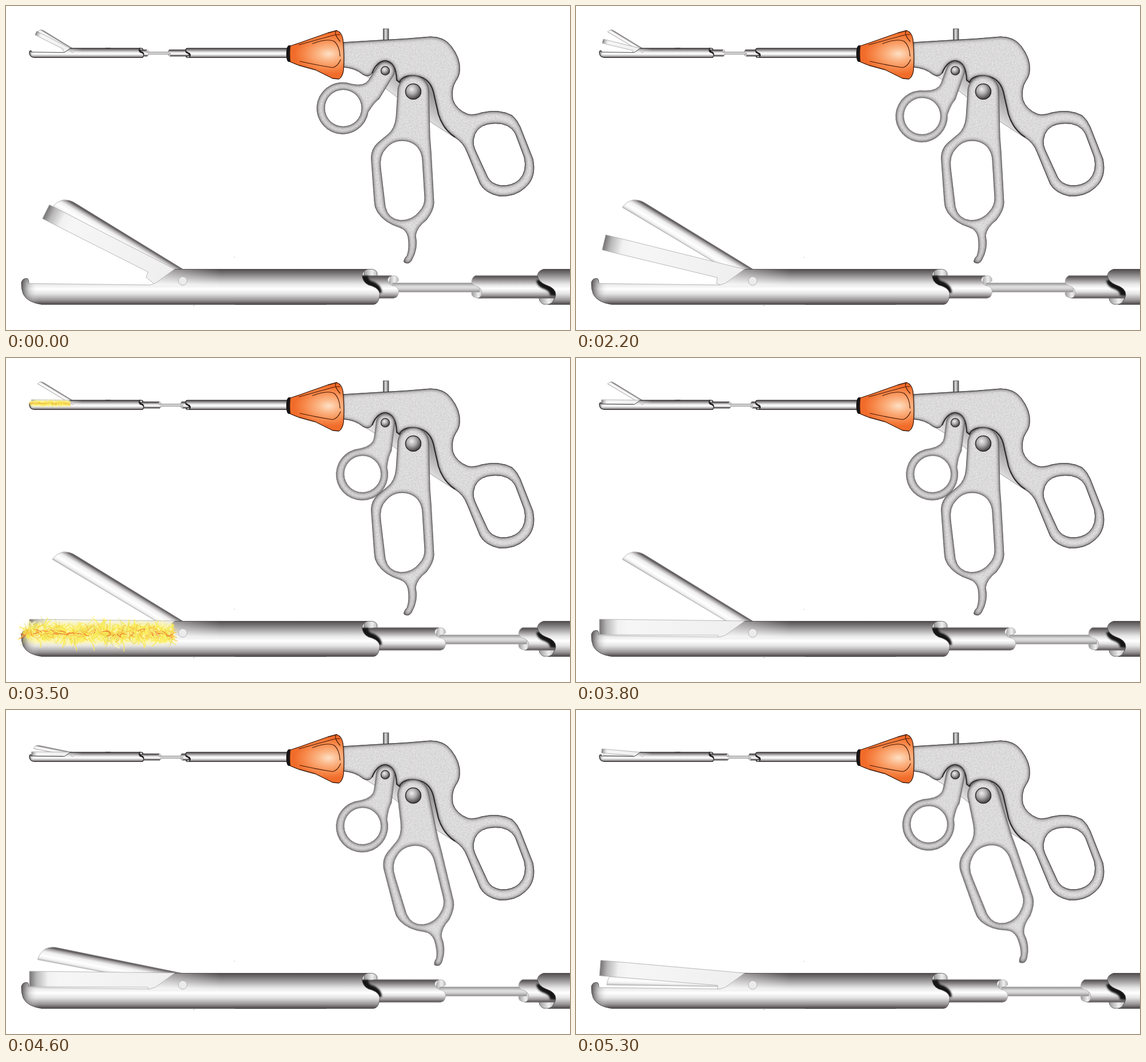
An HTML page for the animation above (7300 ms loop, 986 by 568 pixels).

```html
<!DOCTYPE html>
<html lang="en">
<head>
<meta charset="utf-8">
<title>Grasping forceps</title>
<style>
html, body { margin: 0; width: 100%; height: 100%; overflow: hidden; background: #fff; }
svg { display: block; width: 100%; height: 100%; }
.big { --edge: #4f4a4b; --w: .8px; --soft: #a9a7a7; --lip: #b5b3b3; }
.small { --edge: #2c2a2b; --w: 1.2px; --soft: #a2a0a0; --lip: #3a3839; }
.edge { stroke: var(--edge); stroke-width: var(--w); vector-effect: non-scaling-stroke; }
.soft { stroke: var(--soft); stroke-width: .8px; vector-effect: non-scaling-stroke; }
.lip { stroke: var(--lip); stroke-width: .9px; vector-effect: non-scaling-stroke; }
.line { fill: none; }
.metal { fill: #e6e5e5; stroke: #6d6a6b; stroke-width: .8px; fill-rule: evenodd; filter: url(#metal); }
#body { stroke: #2f2c2d; stroke-width: 1px; }
.groove { fill: none; stroke: #4a1c08; stroke-width: 1.2px; stroke-linecap: round; }
#fuzz path { fill: none; stroke-linecap: round; opacity: .8; }
</style>
</head>
<body>
<svg viewBox="0 0 986 568" preserveAspectRatio="none">
<defs>
  <linearGradient id="tube" gradientUnits="userSpaceOnUse" x1="0" y1="461" x2="0" y2="523.500">
    <stop offset="0" stop-color="#4d4849"/><stop offset=".2" stop-color="#969394"/>
    <stop offset=".42" stop-color="#e8e7e7"/><stop offset=".56" stop-color="#fff"/>
    <stop offset=".7" stop-color="#e4e3e3"/><stop offset=".88" stop-color="#979394"/>
    <stop offset="1" stop-color="#464142"/>
  </linearGradient>
  <linearGradient id="core" href="#tube" y1="473" y2="512.500"/>
  <linearGradient id="rod" gradientUnits="userSpaceOnUse" x1="0" y1="485" x2="0" y2="502">
    <stop offset="0" stop-color="#8d8b8b"/><stop offset=".4" stop-color="#e2e1e1"/>
    <stop offset=".65" stop-color="#d2d1d1"/><stop offset="1" stop-color="#878485"/>
  </linearGradient>
  <linearGradient id="far" x1="0" y1="0" x2="1" y2="0">
    <stop offset="0" stop-color="#999"/><stop offset=".6" stop-color="#f0f0f0"/><stop offset="1" stop-color="#bbb"/>
  </linearGradient>
  <linearGradient id="fade" gradientUnits="userSpaceOnUse" x1="275" y1="0" x2="375" y2="0">
    <stop offset="0" stop-color="#fff" stop-opacity=".5"/><stop offset="1" stop-color="#fff" stop-opacity="0"/>
  </linearGradient>
  <linearGradient id="nib" gradientUnits="userSpaceOnUse" x1="27" y1="0" x2="56" y2="0">
    <stop offset="0" stop-color="#3e393a" stop-opacity=".85"/><stop offset=".45" stop-color="#777" stop-opacity=".3"/>
    <stop offset="1" stop-color="#fff" stop-opacity="0"/>
  </linearGradient>
  <linearGradient id="cover" gradientUnits="userSpaceOnUse" x1="170" y1="407" x2="183" y2="385.6">
    <stop offset="0" stop-color="#bbb9b9"/><stop offset=".16" stop-color="#f1f1f1"/>
    <stop offset=".35" stop-color="#fff"/><stop offset=".65" stop-color="#f0efef"/>
    <stop offset=".85" stop-color="#aeabac"/><stop offset="1" stop-color="#5f5b5c"/>
  </linearGradient>
  <linearGradient id="blade" gradientUnits="userSpaceOnUse" x1="41" y1="0" x2="290" y2="0">
    <stop offset="0" stop-color="#757273"/><stop offset=".05" stop-color="#b9b8b8"/>
    <stop offset=".13" stop-color="#f1f1f1"/><stop offset=".2" stop-color="#f6f6f6"/><stop offset="1" stop-color="#efefef"/>
  </linearGradient>
  <linearGradient id="post"><stop offset="0" stop-color="#555"/><stop offset=".45" stop-color="#e5e5e5"/><stop offset="1" stop-color="#555"/></linearGradient>
  <linearGradient id="plate" gradientUnits="userSpaceOnUse" x1="705" y1="125" x2="678" y2="160">
    <stop offset="0" stop-color="#999797"/><stop offset="1" stop-color="#eae9e9"/>
  </linearGradient>
  <radialGradient id="ball" cx=".4" cy=".35" r=".65">
    <stop offset="0" stop-color="#eee"/><stop offset=".45" stop-color="#b2b0b0"/><stop offset="1" stop-color="#454142"/>
  </radialGradient>
  <radialGradient id="knob" gradientUnits="userSpaceOnUse" cx="0" cy="0" r="1" gradientTransform="translate(564 84) scale(60 36)">
    <stop offset="0" stop-color="#fee0c4"/><stop offset=".3" stop-color="#fcb788"/>
    <stop offset=".7" stop-color="#f78a4c"/><stop offset="1" stop-color="#f16c2a"/>
  </radialGradient>
  <filter id="blur" x="-30%" y="-30%" width="160%" height="160%"><feGaussianBlur stdDeviation="1.6"/></filter>
  <filter id="glow" x="-20%" y="-60%" width="140%" height="220%"><feGaussianBlur stdDeviation="5"/></filter>
  <!-- bevelled edge plus a fine satin grain -->
  <filter id="metal" color-interpolation-filters="sRGB">
    <feComponentTransfer in="SourceAlpha"><feFuncA type="table" tableValues="1 0"/></feComponentTransfer>
    <feGaussianBlur stdDeviation="3.8"/>
    <feComponentTransfer result="rim"><feFuncA type="linear" slope="1.4"/></feComponentTransfer>
    <feFlood flood-color="#474344"/>
    <feComposite in2="rim" operator="in"/>
    <feComposite in2="SourceAlpha" operator="in" result="bevel"/>
    <feTurbulence type="fractalNoise" baseFrequency=".4" numOctaves="2" seed="4"/>
    <feColorMatrix values="0 0 0 0 .5 0 0 0 0 .49 0 0 0 0 .49 .4 0 0 0 -.1"/>
    <feComposite in2="SourceAlpha" operator="in" result="grain"/>
    <feMerge><feMergeNode in="SourceGraphic"/><feMergeNode in="grain"/><feMergeNode in="bevel"/></feMerge>
  </filter>
</defs>
<rect width="986" height="568" fill="#fff"/>

<g class="big">
  <g id="joint">
    <path class="edge" fill="url(#far)" d="M626 461.500H640Q650 463 649 472Q646 476 638 476V490H626Z"/>
    <path class="edge" fill="url(#far)" d="M932 506Q930 519 940 523H950Q962 518 960 496H936Z"/>
    <g id="slide">
      <path class="soft" fill="url(#far)" d="M672 473H680Q687 475 686 482Q680 487 676 486V491H668Z"/>
      <path class="soft" fill="url(#far)" d="M818 496Q811 503 816 509Q820 512 826 512H834V494Z"/>
      <path class="soft" fill="url(#rod)" d="M676 485.500H828V501.500H676Z"/>
      <path class="soft" fill="url(#core)" d="M540 473H674Q666 476 668 483Q671 490 680 491Q688 495 686 504Q684 512 678 512H540Z"/>
      <path class="soft" fill="url(#core)" d="M1060 473H820Q814 476 814 484Q816 490 825 492Q834 497 831 506Q829 512 824 512H1060Z"/>
      <path class="edge line" d="M560 473H674M560 512H678M820 473H1040M826 512H1040"/>
    </g>
    <g class="line" stroke="#181516" stroke-width="12" filter="url(#blur)">
      <path d="M627 473Q627 486 641 489Q651 494 651 503"/>
      <path d="M933 480Q934 488 944 491Q958 497 957 508"/>
    </g>
    <path fill="url(#tube)" d="M400 461H632Q621 465 623 476Q626 488 640 491Q656 497 653 510Q650 523.500 642 523.500H400Z"/>
    <path fill="url(#tube)" d="M1606 461H940Q930 464 929 473Q931 484 944 489Q962 495 961 507Q958 522 948 523.500H1606Z"/>
    <path class="edge line" d="M400 461.500H632Q621 465 623 476Q626 488 640 491Q656 497 653 510Q650 523 642 523H400M1606 461.500H940Q930 464 929 473Q931 484 944 489Q962 495 961 507Q958 522 948 523H1606"/>
  </g>
  <g id="jaws">
    <path id="upper" class="soft" fill="url(#cover)" d="M81 353Q88 343 100 340Q112 339 122 346L309 461L300 476L262 461Z"/>
    <path id="middle" class="soft" fill="url(#blade)" d="M41 458L303 461L300 490L268 500L249 496L248 486L41 485Z"/>
    <path fill="url(#tube)" d="M295 461H560V523.500H62Q38 520 30 505Q26 495 27 484Q30 476 38 478Q40 480 40 486L252 489Q262 487 268 481Z"/>
    <path fill="url(#fade)" d="M295 461H390V490H252Q262 487 268 481Z"/>
    <path fill="url(#nib)" d="M60 523Q38 520 30 505Q26 495 27 484Q30 476 38 478Q40 480 40 486L60 486Z"/>
    <path class="edge line" d="M295 461.500H560M560 523H62Q38 520 30 505Q26 495 27 484Q30 476 38 478Q40 480 40 486"/>
    <path class="lip line" d="M40 486.500L252 489Q262 487 268 481L295 461"/>
    <circle class="soft" cx="309" cy="482" r="7.500" fill="#ebebeb"/>
    <g id="fuzz">
      <rect x="34" y="466" width="258" height="32" rx="14" fill="#fbf07a" filter="url(#glow)"/>
      <path stroke="#fdf8b8" stroke-width="2.600"/>
      <path stroke="#faec4e" stroke-width="1.800"/>
      <path stroke="#dccb4a" stroke-width=".7"/>
      <path stroke="#f8bb3c" stroke-width="1.200"/>
      <path stroke="#ee6a2c" stroke-width="1.300"/>
    </g>
  </g>
  <path class="soft line" d="M325 523L330 526M398.500 440.500H400"/>
</g>

<g class="small">
  <use href="#joint" transform="translate(66.800 -48.600) scale(.266)"/>
  <use href="#jaws" transform="translate(33.800 -48.600) scale(.266)"/>
</g>

<rect x="659.500" y="40" width="9.500" height="22" fill="url(#post)" stroke="#444" stroke-width=".8"/>
<path fill="url(#plate)" stroke="#8a8889" stroke-width=".8" d="M630 123Q660 140 690 165Q730 197 790 234L760 140L700 118L650 100Z"/>
<path id="body" class="metal" d="M588 64L655 60Q700 58 742 54Q766 54 778 70Q795 92 793 113Q793 122 786 132Q778 145 781 164Q787 182 808 190Q818 192 832 187Q862 180 885 192Q894 200 899 212L921 268Q928 300 908 318Q890 335 862 333Q838 328 829 312L806 256Q800 240 785 230Q764 216 756 190L747 150Q740 124 712 122Q692 122 688 134L683 130Q682 98 663 96Q648 97 640 118Q634 126 624 120Q610 108 588 107Z
  M817 235Q820 212 842 207Q870 202 884 215Q888 219 891 225L906 265Q912 290 897 305Q885 316 865 315Q848 312 842 300L820 252Q816 243 817 235Z"/>
<path class="line" stroke="#2b2829" stroke-width="2" d="M640 118Q648 97 663 96Q682 98 683 130L688 134Q692 122 712 122Q740 124 747 150L756 190Q764 216 785 230"/>
<g id="thumb">
  <path class="metal" d="M648 108A16 16 0 0 1 678 120L652 163Q644 168 633 186A45 45 0 1 1 604 137Q626 142 634 130Z
    M622 179A32.500 32.500 0 1 0 557 179A32.500 32.500 0 1 0 622 179Z"/>
</g>
<circle cx="663" cy="113.500" r="7.500" fill="url(#ball)" stroke="#333" stroke-width="1.500"/>
<g id="lever">
  <path class="metal" d="M685 150A27 27 0 0 1 739 148L741 230L743 255L748 345Q748 358 735 375Q718 388 716 402Q721 425 709 446Q704 454 696 449Q695 444 701 438Q706 425 703 405Q700 392 688 388Q662 380 650 362Q644 353 644 342L638.500 266Q639 250 650 240L668 225Q680 215 682 195Z
    M692 236C715 236 727 252 728 270L732 335Q733 350 722 361Q710 376 690 376Q668 374 663 352L655 285Q652 262 664 250Q675 236 692 236Z"/>
</g>
<circle cx="712" cy="150" r="13.500" fill="url(#ball)" stroke="#2e2b2c" stroke-width="1.500"/>

<path d="M498 69H494Q490 71 490 84Q490 97 494 98H498Z" fill="#171314"/>
<path fill="url(#knob)" stroke="#3a1a0c" stroke-width="1.300" stroke-linejoin="round" d="M497 70L512 65L563 47L578 43Q587 46 589 58Q592 85 590 113Q588 125 582 128L571 127L541 112L512 104L497 98Q495 84 497 70Z"/>
<path class="groove" d="M512 68L563 54Q575 50 584 50M536 66Q562 56 574 62Q583 70 584 88M514 97Q545 104 571 108Q580 106 585 94M578 43Q572 48 584 62"/>
</svg>
<script>
const LOOP = 7300;
const el = id => document.getElementById(id);
const fuzzLayers = [...el("fuzz").querySelectorAll("path")];
// strokes, start spread, reach
const FUZZ = [[220, 9, 20], [340, 8, 18], [130, 9, 22], [120, 6, 13], [45, 3, 6]];

function random(seed) {
  return () => {
    seed = (seed * 1664525 + 1013904223) >>> 0;
    return seed / 4294967296;
  };
}

function strands(rnd, [count, spread, reach]) {
  let d = "";
  for (let i = 0; i < count; i++) {
    const x = 30 + rnd() * 262;
    const y = 482 + Math.sin(x / 14) * 2 + (rnd() - .5) * 2 * spread;
    const side = rnd() < .5 ? -1 : 1;
    const dx = (rnd() - .5) * 24;
    const dy = side * reach * (.15 + .85 * rnd() ** 1.6);
    d += `M${x.toFixed(1)} ${y.toFixed(1)}q${(dx * .1).toFixed(1)} ${(dy * .7).toFixed(1)} ${dx.toFixed(1)} ${dy.toFixed(1)}`;
  }
  return d;
}

// a few long loose wisps hanging below
function wisps(rnd) {
  let d = "";
  for (const x of [60, 118, 150, 205, 238, 243]) {
    const end = 14 + rnd() * 10;
    d += `M${x - 6} 492q10 ${end * .4} ${4 + rnd() * 8} ${end}`;
  }
  return d;
}

const fuzzFrames = [11, 47, 83].map(seed => {
  const rnd = random(seed);
  const paths = FUZZ.map(layer => strands(rnd, layer));
  paths[1] += wisps(rnd);
  return paths;
});

const steps = (t, from) => Math.max(0, Math.min(6, Math.floor((t - from) / 100) + 1));
const turn = (id, angle, x, y) => el(id).setAttribute("transform", `rotate(${angle} ${x} ${y})`);

let shown = "";
function draw(t) {
  const close = t >= 5300 ? 5 : steps(t, 2000);
  const cut = steps(t, 4300);
  const spark = t >= 3500 && t < 3800 ? Math.floor((t - 3500) / 100) : -1;
  const key = [close, cut, spark].join();
  if (key === shown) return;
  shown = key;

  turn("middle", 26.6 * (1 - close / 6), 290, 477);
  turn("upper", -5 * cut, 308, 468);
  turn("thumb", -4.06 * close, 663, 113);
  turn("lever", -2.57 * cut, 712, 150);
  el("slide").setAttribute("transform", `translate(${13.7 * close} 0)`);

  el("fuzz").setAttribute("visibility", spark < 0 ? "hidden" : "visible");
  if (spark >= 0) fuzzLayers.forEach((p, i) => p.setAttribute("d", fuzzFrames[spark][i]));
}

const start = performance.now();
function tick() {
  draw((performance.now() - start) % LOOP);
  requestAnimationFrame(tick);
}
tick();
</script>
</body>
</html>
```
